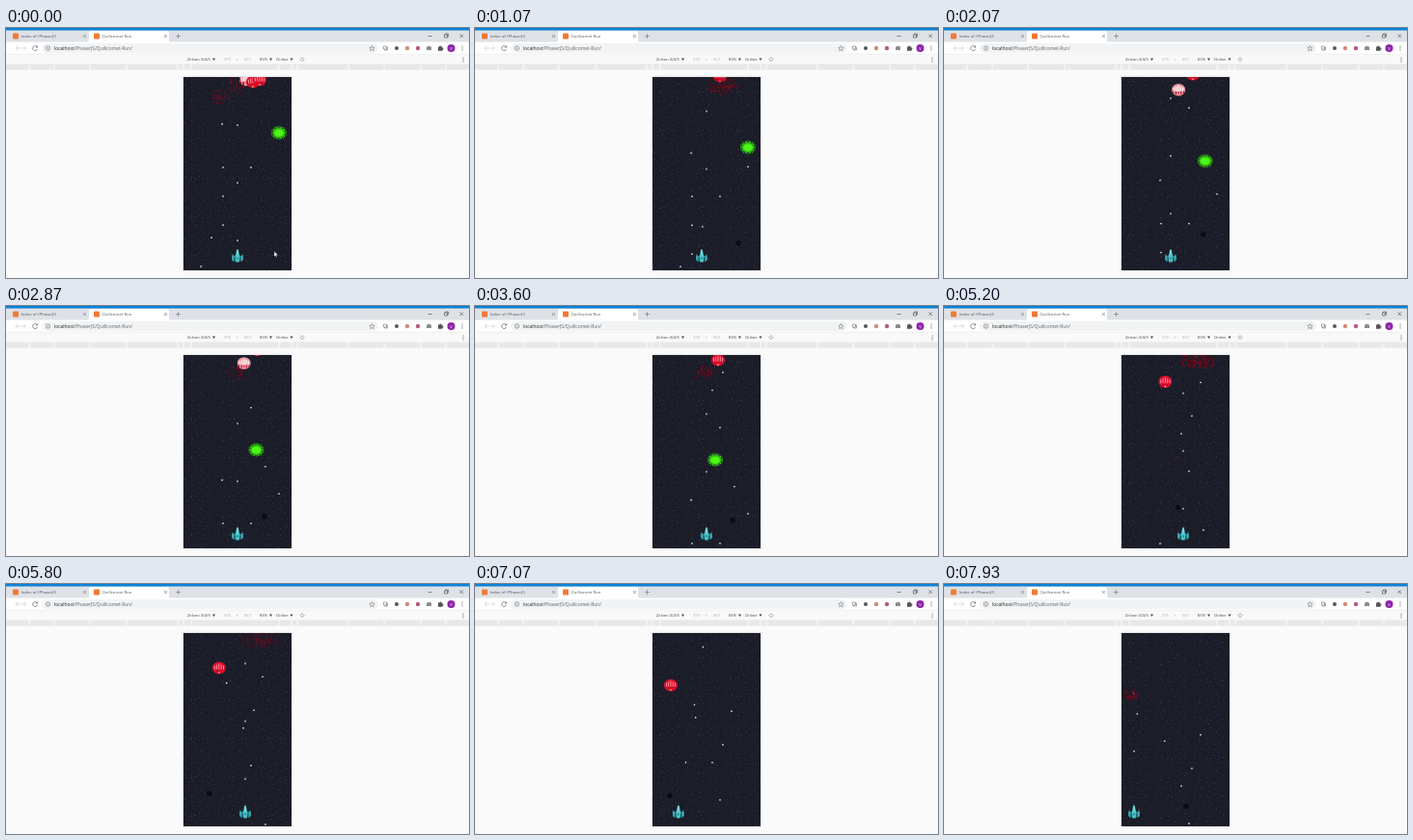
Animation of 480 by 260 pixels, one loop 8000 ms. Source, as an HTML page with a canvas:

```html
<!DOCTYPE html>
<html lang="en">
<head>
<meta charset="utf-8">
<title>Quillcomet Run</title>
<style>
  html, body { margin: 0; width: 100%; height: 100%; overflow: hidden; background: #fafafa; }
  svg, canvas { position: absolute; display: block; }
  svg { left: 0; top: 0; font-family: "Open Sans", "Noto Sans", sans-serif; }
  canvas { left: 184px; top: 51px; box-shadow: 0 0 2px rgba(0, 0, 0, .25); }
</style>
</head>
<body>
<svg width="480" height="260" viewBox="0 0 480 260">
  <rect width="480" height="260" fill="#fafafa"/>
  <rect width="480" height="15" fill="#dee1e6"/>
  <rect width="480" height="2.5" fill="#0883d9"/>
  <path d="M84 15q2 0 2-2V5q0-2 2-2h79q2 0 2 2v8q0 2 2 2z" fill="#fff"/>
  <rect y="14.5" width="480" height="12.5" fill="#fff"/>
  <rect x="37" y="16" width="349" height="10" rx="5" fill="#f1f3f4"/>
  <rect y="27" width="480" height="10.5" fill="#f9f9f9"/>
  <path d="M0 27.2h480" stroke="#e2e2e2" stroke-width=".5"/>
  <rect y="37.5" width="480" height="6" fill="#e8e8e8"/>
  <path d="M24 37.5v6M50 37.5v6M87 37.5v6M125 37.5v6M178 37.5v6M184 37.5v6M192 37.5v6M283 37.5v6M296 37.5v6M302 37.5v6M355 37.5v6M392 37.5v6M430 37.5v6M456 37.5v6" stroke="#fbfbfb"/>
  <g fill="#f07a35"><rect x="7" y="5.500" width="6" height="6" rx="1"/><rect x="91" y="5.500" width="6" height="6" rx="1"/></g>
  <g font-size="4.300" fill="#55595e">
    <text x="15.500" y="10.300">Index of /PhaserJS</text>
    <text x="99.500" y="10.300">Quillcomet Run</text>
  </g>
  <text x="50" y="22.800" font-size="4.900" fill="#202124">localhost<tspan fill="#5f6368">/PhaserJS/Quillcomet-Run/</tspan></text>
  <g font-size="4.100" fill="#444">
    <text x="188" y="34.200">Zelvon 3/4/5</text>
    <g fill="#aaa"><text x="226" y="34.200">375</text><text x="238.500" y="34.200">×</text><text x="247" y="34.200">667</text></g>
    <text x="263" y="34.200">83%</text>
    <text x="280" y="34.200">Online</text>
  </g>
  <path d="M214 31.500h3l-1.500 2.500zM273 31.500h3l-1.500 2.500zM294.500 31.500h3l-1.500 2.500z" fill="#444"/>
  <g fill="none" stroke="#6c7075" stroke-width=".6">
    <path d="M80 7l3 3m0-3l-3 3M164 7l3 3m0-3l-3 3M176 8.500h5m-2.500-2.500v5"/>
    <path d="M437.500 8.500h4M454.500 7h3v3h-3zM455.500 7v-1h3v3h-1M470.500 6.500l3.500 3.500m0-3.500l-3.500 3.500" stroke="#444"/>
    <path d="M15 21h-5m2.300-2.300L10 21l2.300 2.300M15.500 21h5m-2.300-2.300l2.300 2.300-2.300 2.300" stroke="#c4c6c8"/>
    <path d="M32.300 19.700a2.500 2.500 0 1 0 .2 2.300m.1-3.700v1.800h-1.800" stroke-width=".8"/>
    <circle cx="43.500" cy="21" r="2.200"/><path d="M43.500 20.600v1.700m0-2.800v.5"/>
    <path d="M307 30.700l2 2-2 2-2-2z"/>
    <path d="M379.500 18.500l.8 1.700 1.900.2-1.400 1.300.4 1.900-1.700-1-1.700 1 .4-1.900-1.400-1.300 1.900-.2z"/>
    <path d="M391.500 19h3v3h-3zM392.500 22v1h3v-3h-1"/>
  </g>
  <circle cx="405" cy="21" r="2" fill="#555"/>
  <circle cx="416" cy="21" r="2.200" fill="#d08a7c"/>
  <circle cx="427" cy="21" r="2.200" fill="#b85a80"/>
  <path d="M436 19.500h1l.5-.8h2l.5.800h1V23h-5z" fill="#8a8d90"/>
  <path d="M448 19.500h1.300a1 1 0 0 1 2 0h1.200v1.300a1 1 0 0 1 0 2v1h-4.500z" fill="#555"/>
  <circle cx="461.500" cy="21" r="4" fill="#8e24aa"/>
  <text x="461.500" y="22.600" font-size="4.200" fill="#fff" text-anchor="middle">V</text>
  <path d="M473 18.500v5M474 30.500v5" stroke="#5f6368" stroke-dasharray="1"/>
</svg>
<canvas width="112" height="201"></canvas>
<script>
// Times in seconds, positions in stage pixels.
const LOOP = 8, FPS = 15, TILE = 40;
const FALL = 28.3, DRIFT = FALL / 2;
const SHOT_GAP = 60, SHOT_SPEED = SHOT_GAP * FPS, SHOT_CREEP = .9 * FPS;
const ctx = document.querySelector('canvas').getContext('2d');

// Keys are [time, ...values]; linear between neighbours.
function along(keys, t) {
  let i = 1;
  while (i < keys.length - 1 && keys[i][0] < t) i++;
  const a = keys[i - 1], b = keys[i];
  const k = Math.max(0, Math.min(1, (t - a[0]) / (b[0] - a[0])));
  return a.slice(1).map((v, n) => v + (b[n + 1] - v) * k);
}
function seeded(seed) {
  return () => (seed = (seed * 16807) % 2147483647) / 2147483647;
}
function dot(x, y, w, h, color) {
  ctx.fillStyle = color;
  ctx.fillRect(x - w / 2, y - h / 2, w, h);
}
function oval(x, y, rx, ry, color) {
  ctx.fillStyle = color;
  ctx.beginPath();
  ctx.ellipse(x, y, rx, ry, 0, 0, 7);
  ctx.fill();
}
function outline(x, y, points, color) {
  ctx.fillStyle = color;
  ctx.beginPath();
  points.forEach(([dx, dy]) => ctx.lineTo(x + dx, y + dy));
  ctx.closePath();
  ctx.fill();
}

const shipKeys = [[1, 240], [1.04, 235], [2.5, 235], [2.54, 240], [3.7, 240], [3.76, 248], [6.79, 248], [7.17, 197]];
const touchKeys = [[0, 278, 235], [2, 269, 214], [3.6, 267, 223], [4.6, 274, 201], [5.8, 211, 218], [7.07, 202, 220], [7.93, 251, 231]];
const shipX = t => along(shipKeys, t)[0];

// Aliens sink steadily, veer left from `turn` and fire every two seconds.
const bunch = (x, y, count, end) => Array.from({ length: count }, (_, i) =>
  ({ x: x + i * 7, y: y + (i % 2) * 2, turn: LOOP, end, fire: i === 2 ? .5 : LOOP }));
const aliens = [
  ...bunch(249, 54, 3, .4),
  ...bunch(252, -12, 4, 4.85),
  { x: 260.500, y: 5.200, turn: 3, end: 7.750, fire: 1.250 },
  { x: 254, y: 35, turn: 1.300, end: 2.430, fire: 1.300 },
  { x: 258, y: 19, turn: 2.070, end: 3.450, fire: .920 },
  { x: 283, y: 109, turn: 1.200, end: 3.800, fire: .200, green: true }
];
const place = (a, t) => [a.x - DRIFT * Math.max(0, t - a.turn), a.y + DRIFT * t];
const blasts = [[-.5, 222, 72], [-.5, 238, 59], ...aliens.map(a => [a.end, ...place(a, a.end)])];
const strays = [[224, 100], [225, 145], [225, 175], [225, 205], [254, 145], [213, 218], [202, 248]];

function backdrop(shift) {
  ctx.fillStyle = '#1b1d29';
  ctx.fillRect(184, 51, 112, 201);
  const rnd = seeded(731), tones = ['#2a3243', '#2e3748', '#362f3d', '#13151f'];
  for (let i = 0; i < 68; i++) {
    const x = rnd() * TILE | 0, y = rnd() * TILE, tone = tones[rnd() * 4 | 0];
    for (let left = 184; left < 296; left += TILE)
      for (let top = 52 - TILE; top < 252; top += TILE)
        dot(left + x + .5, Math.round(top + (y + shift) % TILE) + .5, 1, 1, tone);
  }
}
function alienShot(x, y) {
  dot(x, y, 1.5, 1.5, '#aeb0b6');
  dot(x, y, 1, 1, '#eee');
}
function redAlien(x, y, hit) {
  oval(x, y, 7, 6.3, hit ? '#ee9aa6' : '#e0102f');
  for (let i = -2; i <= 2; i++) {
    const lift = Math.abs(i);
    dot(x + i * 2.6, y + 4.2 - lift, 1, 4, '#b3062a');
    dot(x + i * 2.3, y - 1.5 + lift * .6, hit ? 1.4 : .9, 6 - lift, hit ? '#fff2f0' : '#ff9aa2');
  }
  dot(x, y + 5, 1.2, 1.6, '#ffd36b');
}
function greenAlien(x, y) {
  for (let i = 0; i < 20; i++) {
    const a = i * Math.PI / 10, r = 7 + i % 2 * .6;
    dot(x + Math.cos(a) * r, y + Math.sin(a) * r * .86, 1.4, 1.4, i % 2 ? '#2a9a12' : '#3fd816');
  }
  oval(x, y, 6.4, 5.5, '#2fba0e');
  oval(x, y + .3, 4.8, 3.8, '#4cf51a');
}
function ship(x) {
  for (const side of [-1, 1]) {
    outline(x, 237, [[0, -1], [side * 4, 0], [side * 5.3, -2.500], [side * 6, 3], [side * 4.5, 6], [side * 1.5, 5]], '#268b94');
    dot(x + side * 5, 239, .9, 5, '#5fc7ca');
    dot(x + side * 2.7, 240.500, .9, 3, '#14545e');
  }
  outline(x, 237, [[-.8, -6.800], [.8, -6.800], [2.100, 0], [1.800, 6.500], [-1.800, 6.500], [-2.100, 0]], '#4cc3c8');
  dot(x, 234, .9, 5, '#a8eceb');
  dot(x, 239.500, 1.2, 2, '#1b6f7b');
}
function blast([start, x, y], t) {
  const age = (t - start) / 1.5;
  if (age < 0 || age > 1) return;
  const rnd = seeded(Math.round(x * 97 + y)), reach = 5 + 7 * Math.sqrt(age);
  ctx.globalAlpha = 1 - age * age;
  for (let i = 0; i < 42; i++) {
    const a = rnd() * 7, r = reach * Math.sqrt(rnd()), hot = rnd() > .6;
    const color = age < .08 ? (hot ? '#ffb327' : '#e51325') : (hot ? '#910a20' : '#570c1b');
    dot(x + Math.cos(a) * r, y + Math.sin(a) * r * .85, 1.3, 1.3, color);
  }
  ctx.globalAlpha = 1;
}
function pointer(t) {
  const [x, y] = along(touchKeys, t);
  if (t > .45) {
    oval(x, y, 3.5, 3.5, '#2b2c34');
    oval(x, y, 3.1, 3.1, '#0c0d14');
    return;
  }
  const arrow = [[0, -3], [0, 3], [1.3, 1.8], [2.2, 3.6], [3.1, 3.2], [2.3, 1.5], [4, 1.4]];
  outline(x, y, arrow, '#fff');
  ctx.lineWidth = .4;
  ctx.strokeStyle = '#111';
  ctx.stroke();
}

function draw(t) {
  ctx.setTransform(1, 0, 0, 1, -184, -51);
  backdrop(FALL * t);
  strays.forEach(([x, y]) => alienShot(x, y + FALL * t));
  for (const a of aliens)
    for (let fired = a.fire; fired <= Math.min(t, a.end); fired += 2) {
      const [x, y] = place(a, fired);
      if (y > 48) alienShot(x, y + 8 + FALL * (t - fired));
    }
  // The gun keeps pace with the frames, so the column of shots only creeps upward.
  const phase = ((41 - SHOT_CREEP * t) % SHOT_GAP + SHOT_GAP) % SHOT_GAP;
  for (let y = SHOT_GAP + phase; y < 230; y += SHOT_GAP)
    if (y > 64) dot(shipX(t - (237 - y) / SHOT_SPEED), y, 1.3, 1.8, '#d5dcde');
  for (const a of aliens) {
    const [x, y] = place(a, t);
    if (t >= a.end || y < 44) continue;
    if (a.green) greenAlien(x, y);
    else redAlien(x, y, Math.abs(x - shipX(t - .2)) < 11);
  }
  blasts.forEach(b => blast(b, t));
  ship(shipX(t));
  pointer(t);
}

const began = performance.now();
function tick() {
  const t = (performance.now() - began) / 1000 % LOOP;
  draw(Math.floor(t * FPS + .1) / FPS);
  requestAnimationFrame(tick);
}
tick();
</script>
</body>
</html>
```
